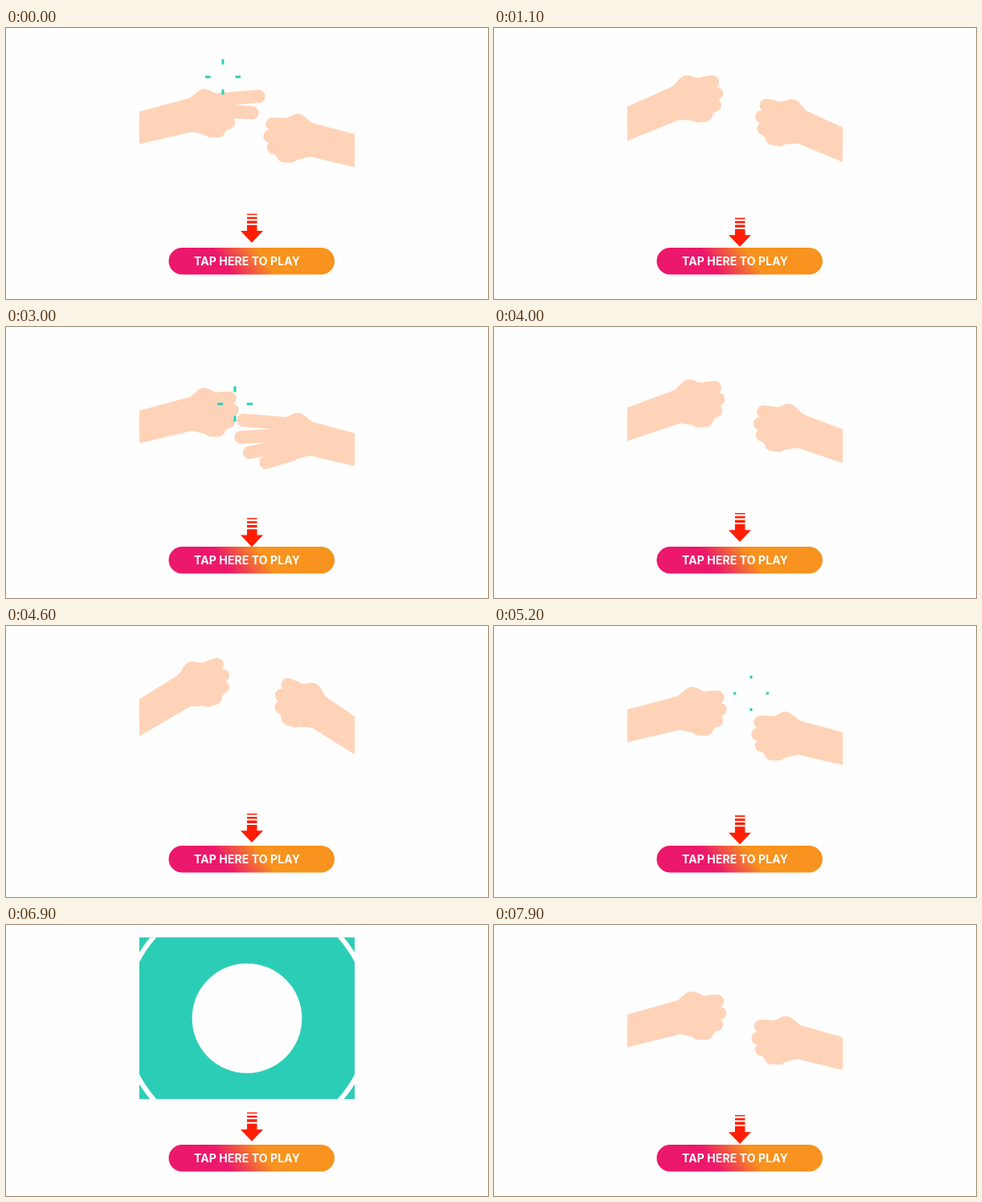
An HTML page that plays this animation: 600x338 px, repeating every 8 s.

```html
<!DOCTYPE html>
<html lang="en">
<head>
<meta charset="utf-8">
<title>Rock paper scissors</title>
<style>
  html, body { margin: 0; width: 100%; height: 100%; overflow: hidden; background: #fefefe; }
  svg { display: block; width: 100vw; height: 100vh; }
  text { font: 700 14px Inter, "Open Sans", sans-serif; letter-spacing: .1px; fill: #fff; }
  .hand { fill: #ffd3b8; }
  .fingers { fill: none; stroke: #ffd3b8; stroke-width: 16.4; stroke-linecap: round; }
</style>
</head>
<body>
<svg viewBox="0 0 600 338">
  <defs>
    <clipPath id="scene"><rect x="166" y="15.5" width="268" height="201.5"/></clipPath>
    <linearGradient id="warm" gradientUnits="userSpaceOnUse" x1="278.5" y1="303.5" x2="313.5" y2="277">
      <stop offset="0" stop-color="#ec186b"/>
      <stop offset="1" stop-color="#f7931e"/>
    </linearGradient>
    <path id="palm" d="M60 134L228 88.5C236 84 239 77 247 77S256 83 266 82.5L278 82L277 127L264 137Q259 138 250 135L234 131Q230 130 225 132L60 171Z"/>
  </defs>
  <g clip-path="url(#scene)">
    <g id="left"><use href="#palm" class="hand"/><path class="fingers"/></g>
    <g transform="matrix(-1 0 0 1 610 31)">
      <g id="right"><use href="#palm" class="hand"/><path class="fingers"/></g>
    </g>
    <path id="burst" fill="none" stroke="#2ccdb6" stroke-width="3"/>
    <g id="rings">
      <circle cx="300" cy="116.3" fill="#2ccdb6"/>
      <circle cx="300" cy="116.3" fill="#fefefe"/>
      <circle cx="300" cy="116.3" fill="#2ccdb6"/>
      <circle cx="300" cy="116.3" fill="#fefefe"/>
    </g>
  </g>
  <rect x="202.5" y="274" width="206.5" height="33.5" rx="16.75" fill="url(#warm)"/>
  <text x="234" y="295.6">TAP HERE TO PLAY</text>
  <path id="arrow" fill="#ff1e05" d="M300 -36h12.5v1.6h-12.5zM300 -32h12.5v2.6h-12.5zM300 -27.3h12.5v3.3h-12.5zM300 -22h12.5v7.3h7.5L306 0L292 -14.7h8z"/>
</svg>
<script>
const LOOP = 8000;
const $ = id => document.getElementById(id);
const clamp = p => Math.min(1, Math.max(0, p));
const smooth = p => p * p * (3 - 2 * p);

// Closed fist, and how far each finger reaches out of it
const FIST = [[278.5, 90], [281.5, 105], [277, 119], [264.5, 129.5]];
const REACH = { rock: [0, 0, 0, 0], paper: [36, 36, 30, 22], scissors: [36, 25, 0, 0] };

// Each pump lifts the arms: time of the peak, degrees
const PUMPS = [[1350, 20], [2050, 20], [4150, 7], [4750, 22], [7500, 17]];
const PUMP_HALF = 460;

// start time, centre
const BURSTS = [[-210, 270, 61], [150, 333, 95], [2800, 285, 96], [4948, 320, 84], [5450, 320, 84]];
const BURST_LIFE = 300;

// start times of the expanding wipe circles
const WIPE = [6480, 6508, 6523, 6730], WIPE_SPEED = .4, WIPE_END = 7200;

function lift(t) {
  return Math.max(...PUMPS.map(([peak, angle]) => {
    const p = clamp(Math.abs(t - peak) / PUMP_HALF);
    return angle * Math.cos(p * Math.PI / 2) ** 2;
  }));
}

function setHand(id, pose, angle, dy) {
  const hand = $(id);
  hand.setAttribute("transform", `translate(0 ${dy}) rotate(${-angle} 132 123)`);
  hand.lastElementChild.setAttribute("d", FIST.map(([x, y], i) => {
    const reach = REACH[pose][i], spread = (i - .6) * .18;
    return `M${x - 10} ${y}L${x + reach} ${y + reach * spread}`;
  }).join(""));
}

function burstPath(t) {
  return BURSTS.map(([start, x, y]) => {
    const q = (t - start) / BURST_LIFE;
    if (q < 0 || q >= 1) return "";
    const inner = 22 * q, len = 22 * Math.min(1, 2 * q) - inner;
    return `M${x} ${y - inner}v${-len}M${x} ${y + inner}v${len}` +
      `M${x - inner} ${y}h${-len}M${x + inner} ${y}h${len}`;
  }).join("");
}

function draw(t) {
  const angle = lift(t);
  const dy = 8 * smooth(clamp((t - 7500) / 400)) - 1;
  setHand("left", t < 950 ? "scissors" : "rock", angle, dy);
  // The right arm swings wider the higher it goes
  setHand("right", t >= 2400 && t < 3650 ? "paper" : "rock", angle * (1 + angle / 110), dy);
  $("burst").setAttribute("d", burstPath(t));

  [...$("rings").children].forEach((ring, i) =>
    ring.setAttribute("r", t < WIPE_END ? Math.max(0, (t - WIPE[i]) * WIPE_SPEED) : 0));

  const tip = 271 - 3.4 * Math.cos(2 * Math.PI * (.04 + 1.47 * t / 1000));
  $("arrow").setAttribute("transform", `translate(0 ${tip})`);
}

const begin = performance.now();
function tick() {
  draw((performance.now() - begin) % LOOP);
  requestAnimationFrame(tick);
}
tick();
</script>
</body>
</html>
```
